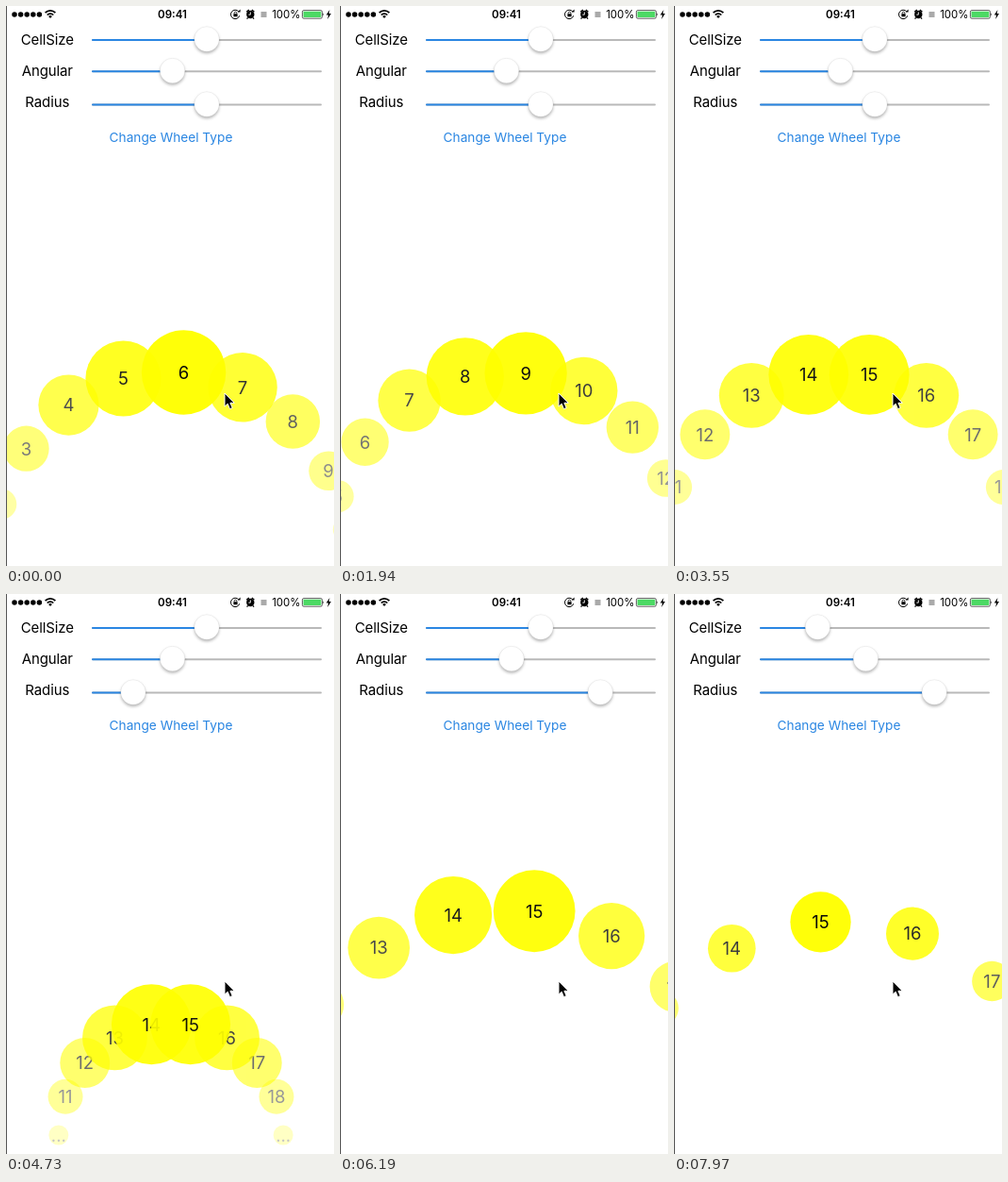
An HTML page that plays this animation: 348x593 px, repeating every 8 s.

```html
<!DOCTYPE html>
<html lang="en">
<head>
<meta charset="utf-8">
<title>Wheel layout</title>
<style>
  html, body { margin: 0; width: 100%; height: 100%; overflow: hidden; background: #fff; }
  svg { display: block; width: 348px; height: 593px; overflow: hidden; }
  text { font-family: Inter, Roboto, "Liberation Sans", sans-serif; text-anchor: middle; }
  .label { font-size: 15px; letter-spacing: -.12px; }
  .cell text { font-size: 18.5px; }
  .thumb { fill: #fff; stroke: #000; stroke-opacity: .1; stroke-width: .6; filter: drop-shadow(0 2px 1.5px rgba(0, 0, 0, .28)); }
</style>
</head>
<body>
<svg viewBox="0 0 348 593">
  <g id="wheel"></g>

  <g id="status">
    <g id="dots"></g>
    <g fill="none" stroke="#000" stroke-width="1.7">
      <path d="M41.6 7.2a7.6 7.6 0 0 1 10.8 0M43.7 9.5a4.6 4.6 0 0 1 6.6 0"/>
    </g>
    <path d="M47 13l-1.9-2a2.7 2.7 0 0 1 3.8 0z"/>
    <text x="176.5" y="13" font-size="11.6" font-weight="600">09:41</text>
    <g fill="none" stroke="#000">
      <path d="M246.8 5.9a4.7 4.7 0 1 0 .9 4.4" stroke-width="1"/>
      <path d="M242.2 8.4v-.9a1.3 1.3 0 0 1 2.6 0v.9" stroke-width=".8"/>
    </g>
    <path d="M245.6 6.5h3v-3zM241.4 8.2h4.2v3h-4.2z"/>
    <circle cx="259.3" cy="9" r="4.2"/>
    <path d="M255.2 6.2l2.6-2.2M263.4 6.2l-2.6-2.2M256.6 12.4l-1 1.2M262 12.4l1 1.2" stroke="#000" stroke-width="1.4"/>
    <path d="M259.3 6.4v2.8h-2" fill="none" stroke="#fff" stroke-width=".9"/>
    <rect x="270.5" y="6" width="6" height="6" fill="#aaa"/>
    <text x="297.3" y="13" font-size="11.4">100%</text>
    <rect x="314.4" y="4.6" width="21" height="8.6" rx="1.6" fill="#fff" stroke="#333" stroke-width=".8"/>
    <rect x="315.5" y="5.7" width="18.8" height="6.4" rx=".7" fill="#4cd964"/>
    <path d="M336.4 7.2q1.5 1.7 0 3.4z"/>
    <path d="M343.4 4l-3.6 5.5h2.2l-.8 4.4 3.7-5.8h-2.3z"/>
  </g>

  <g id="sliders"></g>
  <text x="175" y="144" font-size="13.7" fill="#2a86e2">Change Wheel Type</text>
  <rect width="1" height="593" fill="#555"/>
  <path d="M232 410v14.2l3.2-3 2.3 5.5 2.7-1.1-2.3-5.3h4.4z" stroke="#fff" stroke-width="1"/>
</svg>

<script>
const LOOP = 8000, STEP = 147.5, SCALE = 0.928;
const CENTER_X = 175, BASE_Y = 619.5, FADE = 0.0086;

// [step, value] pairs, linear between them
const tracks = {
  position: [[6, 5.79], [9, 7.16], [17, 10.155], [24, 14.5], [41, 14.5], [46, 15.197]],
  cell: [[51, 0.5], [54, 0.222]],
  angular: [[41, 0.333], [46, 0.456]],
  radius: [[24, 0.5], [29, 0.175], [30, 0.175], [32, 0.142], [33, 0.142], [38, 0.79]]
};

function valueAt(track, step) {
  if (step <= track[0][0]) return track[0][1];
  for (let i = 1; i < track.length; i++) {
    const [s0, v0] = track[i - 1], [s1, v1] = track[i];
    if (step <= s1) return v0 + (v1 - v0) * (step - s0) / (s1 - s0);
  }
  return track[track.length - 1][1];
}

function add(parent, tag, attrs = {}, text = "") {
  const el = document.createElementNS("http://www.w3.org/2000/svg", tag);
  for (const key in attrs) el.setAttribute(key, attrs[key]);
  el.textContent = text;
  parent.appendChild(el);
  return el;
}

const byId = id => document.getElementById(id);
const wheel = byId("wheel");

for (let i = 0; i < 5; i++) add(byId("dots"), "circle", { cx: 9 + i * 6.6, cy: 9, r: 2.75 });

function makeSlider(name, labelY, trackY, thumbY) {
  const g = byId("sliders");
  add(g, "text", { class: "label", x: 43.8, y: labelY }, name);
  add(g, "rect", { x: 91, y: trackY - 1, width: 244, height: 2, rx: 1, fill: "#b9b9b9" });
  const fill = add(g, "rect", { x: 91, y: trackY - 1, height: 2, rx: 1, fill: "#2a86e2" });
  const thumb = add(g, "circle", { class: "thumb", cy: thumbY, r: 13.2 });
  return value => {
    const x = 104 + 218 * value;
    fill.setAttribute("width", x - 91);
    thumb.setAttribute("cx", x);
  };
}

const sliders = {
  cell: makeSlider("CellSize", 40.5, 36, 35),
  angular: makeSlider("Angular", 73.5, 69.3, 68.5),
  radius: makeSlider("Radius", 106.8, 104.5, 104)
};

const cells = Array.from({ length: 24 }, (_, index) => {
  const g = add(wheel, "g", { class: "cell" });
  return {
    index, g,
    disc: add(g, "circle", { fill: "#ff0" }),
    label: add(g, "text", { y: 6.8 }, index)
  };
});

function drawWheel(position, cell, angular, radius) {
  const size = SCALE * (50 + 100 * cell) / 2;
  const reach = SCALE * (100 + 200 * radius);
  const gap = 10 + 30 * angular;
  const centerY = BASE_Y - size;
  const far = c => Math.abs(c.index - position);

  // nearest to the top is painted last; later cells win ties
  const order = [...cells].sort((a, b) => far(b) - far(a) || a.index - b.index);
  for (const c of order) {
    const angle = (c.index - position) * gap;
    const strength = 1 - FADE * Math.abs(angle);
    const shown = Math.abs(angle) < 100;
    c.g.style.display = shown ? "" : "none";
    if (!shown) continue;
    const rad = angle * Math.PI / 180, r = size * strength;
    c.g.setAttribute("transform",
      `translate(${CENTER_X + reach * Math.sin(rad)} ${centerY - reach * Math.cos(rad)})`);
    c.g.setAttribute("opacity", strength);
    c.disc.setAttribute("r", r);
    c.label.textContent = c.index > 9 && r < 11.5 ? "..." : c.index;
    wheel.appendChild(c.g);
  }
}

let lastStep = -1;
function render(now) {
  const step = Math.floor((now % LOOP + 12) / STEP);
  if (step !== lastStep) {
    lastStep = step;
    const v = {};
    for (const name in tracks) v[name] = valueAt(tracks[name], step);
    for (const name in sliders) sliders[name](v[name]);
    drawWheel(v.position, v.cell, v.angular, v.radius);
  }
}

const start = performance.now();
function tick() {
  render(performance.now() - start);
  requestAnimationFrame(tick);
}
tick();
</script>
</body>
</html>
```
